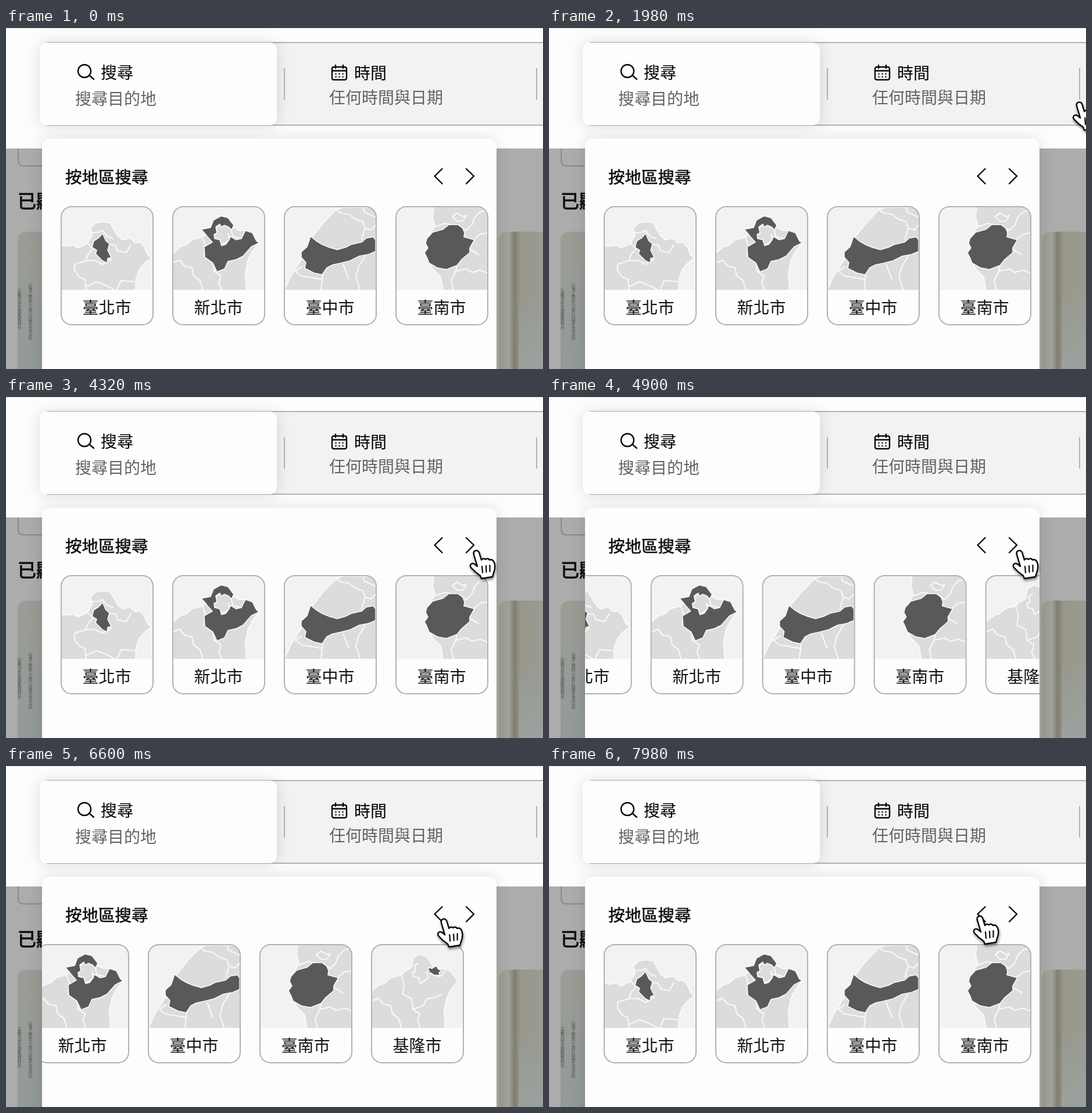
Write an HTML page that moves like this. It is 924x586 px and loops after 8000 ms.

```html
<!DOCTYPE html>
<html lang="zh-Hant">
<head>
<meta charset="utf-8">
<style>
html, body { margin: 0; width: 100%; height: 100%; overflow: hidden; }
svg { display: block; width: 924px; height: 586px; font: 28px "Noto Sans CJK TC", "Noto Sans CJK", sans-serif; }
.raised { fill: #fdfdfd; filter: drop-shadow(0 1px 12px #00000021); }
.rule { fill: none; stroke: #b2b2b0; stroke-width: 2; }
.icon { fill: none; stroke: #080808; stroke-width: 2.4; stroke-linecap: round; stroke-linejoin: round; }
.hint { fill: #646464; }
.strong { fill: #111; stroke: #111; stroke-width: .6; }
.tiny { font-size: 7px; fill: #48514e; writing-mode: vertical-rl; }
.land { fill: #dcdcdc; }
.border { fill: none; }
.land, .border, .region { stroke: #f8f8f8; stroke-width: 2.2; stroke-linejoin: round; }
.region { fill: #595959; stroke-width: 1.6; }
.label { text-anchor: middle; fill: #111; }
#hand { filter: drop-shadow(1px 3px 2px #0007); }
</style>
</head>
<body>
<svg viewBox="0 0 924 586">
  <defs>
    <linearGradient id="cover">
      <stop offset="0" stop-color="#9c9c90"/><stop offset=".17" stop-color="#a3a39b"/>
      <stop offset=".27" stop-color="#817d6e"/><stop offset=".37" stop-color="#97978c"/>
      <stop offset="1" stop-color="#9d9d93"/>
    </linearGradient>
    <linearGradient id="fade" x1="0" y1="0" x2="0" y2="1">
      <stop offset=".4" stop-color="#9aa19d" stop-opacity="0"/><stop offset="1" stop-color="#9aa19d"/>
    </linearGradient>
    <linearGradient id="spine" x1="0" y1="0" x2="0" y2="1">
      <stop offset="0" stop-color="#9b9c95"/><stop offset="1" stop-color="#929a99"/>
    </linearGradient>
    <clipPath id="panelClip"><rect x="62" y="190" width="782" height="400"/></clipPath>
    <clipPath id="mapClip"><path d="M2 144V18Q2 2 18 2H142Q158 2 158 18V144Z"/></clipPath>
  </defs>

  <!-- dimmed page -->
  <rect width="924" height="586" fill="#acacac"/>
  <path d="M21 200V227Q21 237 31 237H80" fill="none" stroke="#8c8c78" stroke-width="2"/>
  <text x="20" y="308.500" class="strong" style="font-size:32px;stroke-width:1">已顯</text>
  <rect x="20" y="350" width="90" height="260" rx="14" fill="url(#spine)"/>
  <text x="42" y="438" class="tiny">山海之間的小旅行與慢生活日記</text>
  <text x="23" y="448" class="tiny">沿著河岸走讀舊城時光</text>
  <rect x="848" y="350" width="100" height="260" rx="14" fill="url(#cover)"/>
  <rect x="882" y="350" width="42" height="236" fill="url(#fade)"/>

  <!-- header -->
  <rect width="924" height="207" fill="#fdfdfd"/>
  <path d="M0 .5H924" stroke="#e4e4e0"/>
  <rect x="70" y="25" width="900" height="142" rx="12" fill="#f2f2f2"/>
  <path class="rule" d="M70 25H924M70 167H924"/>
  <path class="rule" d="M479 69V123M913 69V123"/>
  <rect x="62" y="190" width="782" height="420" rx="14" class="raised"/>
  <rect x="58" y="25" width="408" height="142" rx="12" class="raised"/>
  <g class="icon">
    <circle cx="135" cy="74" r="11"/><path d="M143 81L151 88"/>
    <rect x="561" y="67" width="25" height="22" rx="3"/>
    <path d="M567 64V69M580 64V69M561 73.5H586"/>
    <path d="M567.5 79h.1M573.5 79h.1M579.5 79h.1M567.5 84h.1M573.5 84h.1M579.5 84h.1"/>
  </g>
  <text x="163" y="87">搜尋</text>
  <text x="119" y="132" class="hint">搜尋目的地</text>
  <text x="599" y="88">時間</text>
  <text x="556" y="130" class="hint">任何時間與日期</text>

  <!-- region panel -->
  <text x="102" y="266.500" class="strong" style="font-size:28.5px">按地區搜尋</text>
  <path class="icon" d="M750.500 242L737.500 254.500L750.500 267.500M792 242L805 254.500L792 267.500"/>
  <g clip-path="url(#panelClip)"><g id="cards"></g></g>

  <g id="hand">
    <path d="M8 8C6 1 14 -2 17 4L21 17Q24 13 28 16Q32 13 35 17Q40 15 43 21Q46 30 42 39L40 46L21 49L19 44Q10 38 3 30C0 26 4 21 9 24L14 28Z" fill="#fff" stroke="#080808" stroke-width="2.4" stroke-linejoin="round"/>
    <path d="M22 28L23 39M29 27L29.500 38M35.500 26L35.500 37" class="icon" style="stroke-width:2.2"/>
  </g>
</svg>
<script>
const north = {
  land: 'M0 82L14 70L24 67L34 58L52 53L60 46L70 40L72 24L84 17L97 22L106 37L116 42L124 42L136 46L150 63L138 78L130 94L126 116L128 146H0Z',
  border: 'M0 98L13 93L21 103L34 106L37 120L48 128L53 146M52 53L57 68L55 86L70 94L72 112L84 120L80 132L86 146M72 112L90 106L96 94L110 92L122 86M82 32L75 37L77 46L72 49L73 56L82 58L85 68L99 58L96 47M101 38L104 52L119 56L128 46'
};
const regions = [
  { name: '臺北市',
    land: 'M0 67L12 69L22 67L30 72L46 64L54 50L51 38L60 29L72 27L86 29L91 39L98 51L106 58L119 55L128 63L137 62L144 70L150 84L157 89L146 97L136 108L130 124L129 146H0Z',
    border: 'M46 64L56 73L48 82L43 94L24 100L24 110L32 122L42 126L44 146M51 46L66 45L72 42L80 52L91 56M84 66L94 67L98 77L113 80L121 66M43 94L58 93L72 100L88 91M44 138L62 130L82 138L96 146L104 128L128 130',
    dark: 'M72 47L78 60L84 65L81 76L87 88L81 90L80 98L72 94L60 82L62 76L54 71L57 60L66 54Z' },
  { ...north, name: '新北市',
    dark: 'M50 40L66 37L71 24L84 17L96 20L106 33L102 41L97 36L90 33L84 36L82 31L75 36L77 46L72 49L73 56L82 58L85 68L92 66L98 58L100 52L110 58L119 56L126 42L138 46L145 60L150 63L136 70L122 86L110 92L96 95L90 108L77 113L70 98L56 88L55 70L69 62L60 52L57 48Z' },
  { name: '臺中市',
    land: 'M0 146L12 120L30 92L48 54L67 30L90 6L102 2H160V146Z',
    border: 'M90 6L98 12L112 14L122 22L136 27L140 38L150 41L160 31M140 38L134 58M136 0L138 10L160 20M67 118L64 146M32 104L20 112L30 120L66 126M140 86L129 104L124 122L132 146M102 100L112 126',
    dark: 'M30 79L40 70L46 52L56 60L66 66L78 71L92 75L106 71L116 66L134 62L142 55L154 53L158 58V78L146 83L130 86L114 94L98 98L84 101L74 106L66 118L52 115L36 107L38 97L30 88Z' },
  { name: '臺南市',
    land: 'M66 0L64 19L68 34L54 56L52 84L64 108L78 122L82 146H160V0Z',
    border: 'M68 36L84 30L98 32L112 36L122 42L132 32L136 20L146 10L160 6M98 18L106 12L116 18L122 16L116 26L106 26ZM134 58L146 48L160 46M106 102L104 112L122 108L132 114L146 110L160 116M104 112L96 128L100 146M128 74L144 84',
    dark: 'M54 56L64 45L82 40L92 32L108 32L116 38L119 46L118 53L136 58L128 72L128 80L114 92L106 102L88 109L72 106L58 98L54 88L50 80L56 72L52 64Z' },
  { ...north, name: '基隆市',
    dark: 'M98 40L105 42L112 37L116 43L122 46L117 49L118 54L108 53L100 48Z' }
];

const cards = document.getElementById('cards');
const hand = document.getElementById('hand');

cards.innerHTML = regions.map((r, i) => `
  <g transform="translate(${94 + 192 * i} 306)">
    <g clip-path="url(#mapClip)">
      <rect width="160" height="144" fill="#f2f2f2"/>
      <path class="land" d="${r.land}"/>
      <path class="border" d="${r.border}"/>
      <path class="region" d="${r.dark}"/>
    </g>
    <rect class="rule" x="1" y="1" width="158" height="203" rx="18"/>
    <text class="label" x="79.500" y="185">${r.name}</text>
  </g>`).join('');

const LOOP = 8000, MAX_SCROLL = 234, SCROLL_STEPS = 12.4;

// Pointer moves: [start step, end step, x, y]
const pointerStart = [939, 90];
const pointerMoves = [
  [41, 56, 783, 237],
  [70, 88, 797, 263],
  [130, 144, 740, 262],
  [158, 170, 729, 257]
];

const progress = (n, a, b) => Math.min(1, Math.max(0, (n - a) / (b - a)));
const easeOut = u => 1 - (1 - u) ** 2;
const smooth = u => u * u * (3 - 2 * u);
const scrolled = (n, from) => smooth(progress(n, from, from + SCROLL_STEPS));

// Steps come in groups of three lasting 20, 100 and 20 ms.
function stepAt(ms) {
  const rest = ms % 140;
  return Math.floor(ms / 140) * 3 + (rest < 20 ? 0 : rest < 120 ? 1 : 2);
}

function draw(now) {
  const n = stepAt(now % LOOP);
  let [x, y] = pointerStart;
  for (const [a, b, toX, toY] of pointerMoves) {
    const u = easeOut(progress(n, a, b));
    x += (toX - x) * u;
    y += (toY - y) * u;
  }
  hand.setAttribute('transform', `translate(${x} ${y})`);
  const scroll = MAX_SCROLL * (scrolled(n, 99) - scrolled(n, 152.4));
  cards.setAttribute('transform', `translate(${-scroll} 0)`);
}

const start = performance.now();
function tick() {
  draw(performance.now() - start);
  requestAnimationFrame(tick);
}
tick();
</script>
</body>
</html>
```
